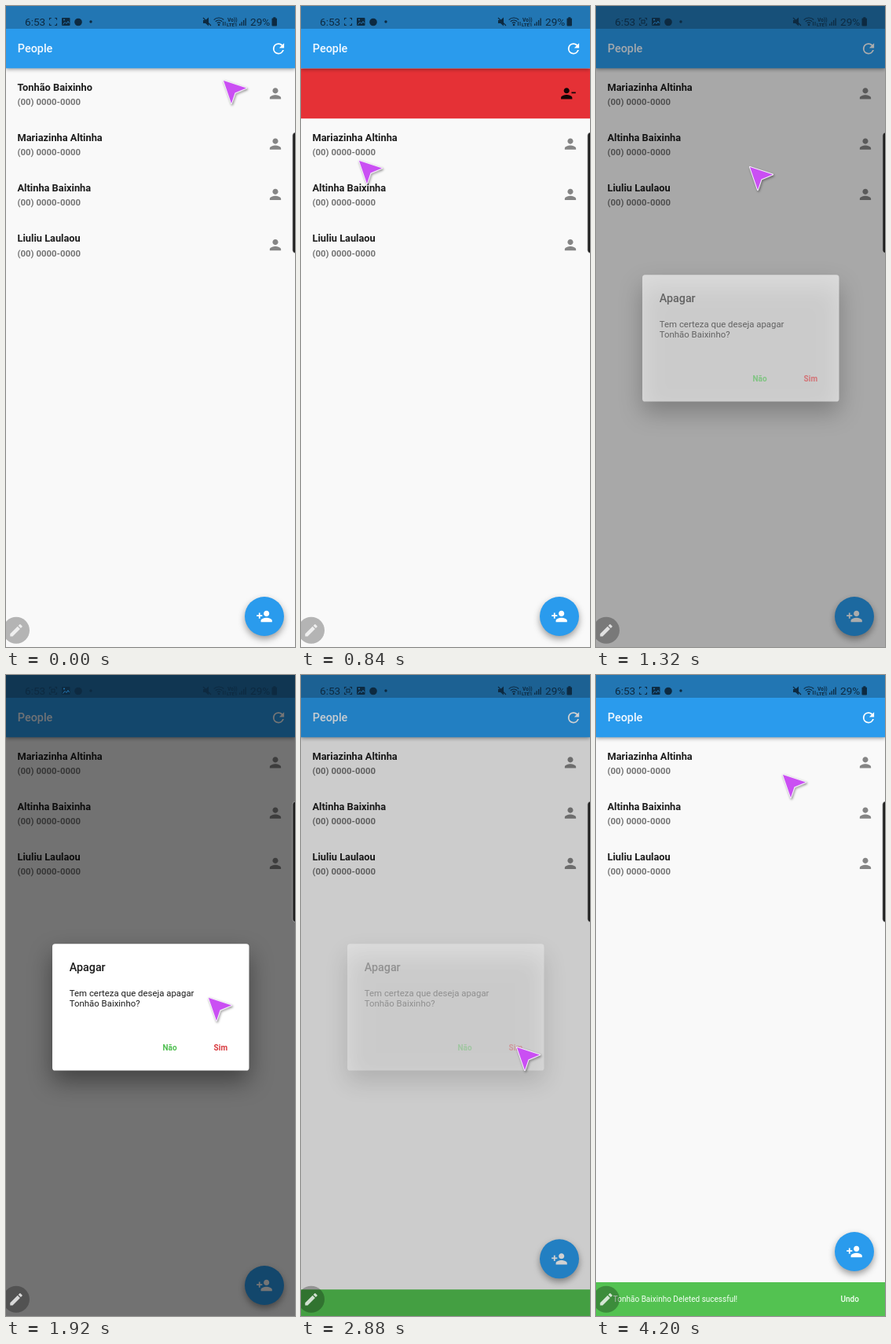
An HTML page with a canvas that plays this animation: 368 px wide and 816 px high, repeating every 4320 ms.

```html
<!DOCTYPE html>
<html lang="pt">
<head>
<meta charset="utf-8">
<title>People</title>
<style>
  html, body { margin: 0; width: 368px; height: 816px; overflow: hidden; background: #f9f9f9; }
  canvas { display: block; width: 368px; height: 816px; }
</style>
</head>
<body>
<canvas id="stage"></canvas>
<script>
const W = 368, H = 816, LOOP = 4320, STEP = 120, DP = 0.892;
const ROW_TOP = 79.2, ROW_H = 64.25;
const canvas = document.getElementById('stage');
const ratio = window.devicePixelRatio || 1;
canvas.width = W * ratio;
canvas.height = H * ratio;
const ctx = canvas.getContext('2d');

const people = ['Tonhão Baixinho', 'Mariazinha Altinha', 'Altinha Baixinha', 'Liuliu Laulaou'];

const body = 'c2.21 0 4-1.79 4-4s-1.79-4-4-4-4 1.79-4 4 1.79 4 4 4zm0 2c-2.67 0-8 1.34-8 4v2h16v-2c0-2.66-5.33-4-8-4z';
const icons = {
  person: new Path2D('M12 12' + body),
  add: new Path2D('M15 12' + body + 'M6 10V7H4v3H1v2h3v3h2v-3h3v-2z'),
  remove: new Path2D('M10 12' + body + 'M17 10v2h6v-2z'),
  refresh: new Path2D('M17.65 6.35C16.2 4.9 14.2 4 12 4a8 8 0 1 0 7.73 10h-2.08A6 6 0 1 1 12 6c1.66 0 3.14.69 4.22 1.78L13 11h7V4z'),
  pencil: new Path2D('M3 17.25V21h3.75L17.8 9.94l-3.75-3.75zM20.7 7.04a1 1 0 0 0 0-1.41l-2.34-2.34a1 1 0 0 0-1.41 0l-1.83 1.83 3.75 3.75z'),
  pointer: new Path2D('M0 0L29 9.5 14.5 15.5 10 29z')
};

// time, x, y of the pointer tip
const pointerPath = [
  [0, 277, 95], [120, 269, 100], [240, 232, 111], [360, 180, 133], [480, 122, 168],
  [600, 74, 203], [720, 62, 206], [840, 74, 197], [1080, 142, 173], [1200, 177, 170],
  [1440, 215, 240], [1680, 246, 350], [1920, 258, 411], [2160, 268, 450], [2400, 274, 474],
  [2880, 275, 474], [3120, 277, 490], [3360, 274, 519], [3600, 262, 450],
  [3840, 235, 310], [4080, 222, 183], [4200, 238, 127]
];

const clamp = v => Math.max(0, Math.min(1, v));
const span = (t, from, to) => clamp((t - from) / (to - from));
const easeOut = p => 1 - (1 - p) ** 3;

function pointerAt(t) {
  const i = pointerPath.findIndex(p => p[0] >= t);
  if (i < 1) return pointerPath[0].slice(1);
  const [t0, x0, y0] = pointerPath[i - 1], [t1, x1, y1] = pointerPath[i];
  const p = span(t, t0, t1);
  return [x0 + (x1 - x0) * p, y0 + (y1 - y0) * p];
}

function rect(x, y, w, h, color, r = 0) {
  ctx.fillStyle = color;
  ctx.beginPath();
  ctx.roundRect(x, y, w, h, r);
  ctx.fill();
}

function disc(x, y, r, color) {
  ctx.fillStyle = color;
  ctx.beginPath();
  ctx.arc(x, y, r, 0, 7);
  ctx.fill();
}

function text(s, x, y, size, color, weight = 400) {
  ctx.font = `${weight} ${size}px Roboto, sans-serif`;
  ctx.fillStyle = color;
  ctx.fillText(s, x, y);
}

function icon(name, cx, cy, color, scale = DP) {
  ctx.save();
  ctx.translate(cx, cy);
  ctx.scale(scale, scale);
  ctx.translate(-12, -12);
  ctx.fillStyle = color;
  ctx.fill(icons[name]);
  ctx.restore();
}

function line(color, width, ...points) {
  ctx.strokeStyle = color;
  ctx.lineWidth = width;
  ctx.beginPath();
  points.forEach(([x, y], i) => i ? ctx.lineTo(x, y) : ctx.moveTo(x, y));
  ctx.stroke();
}

function withShadow(color, blur, dy, draw, dx = 0) {
  ctx.save();
  ctx.shadowColor = color;
  ctx.shadowBlur = blur * ratio;
  ctx.shadowOffsetX = dx * ratio;
  ctx.shadowOffsetY = dy * ratio;
  draw();
  ctx.restore();
}

function drawRow(name, top, dx = 0) {
  text(name, 14.5 + dx, top + 28.3, 12.8, '#1d1d1d', 700);
  text('(00) 0000-0000', 14.5 + dx, top + 46.7, 11.4, '#747474', 700);
  icon('person', 343 + dx, top + 32.2, '#858585');
}

function drawList(t) {
  const drag = t <= 720 ? Math.min(0, pointerAt(t)[0] - 274.5) : -W;
  const collapse = easeOut(span(t, 1030, 1225));
  const height = ROW_H * (1 - collapse);
  if (height > 0) {
    ctx.save();
    ctx.beginPath();
    ctx.rect(0, ROW_TOP, W, height);
    ctx.clip();
    if (drag < 0) {
      rect(W + drag, ROW_TOP, -drag, ROW_H, '#e53136');
      ctx.save();
      ctx.beginPath();
      ctx.rect(W + drag, ROW_TOP, -drag, ROW_H);
      ctx.clip();
      icon('remove', 340, ROW_TOP + height / 2, '#140506');
      ctx.restore();
    }
    drawRow(people[0], ROW_TOP, drag);
    ctx.restore();
  }
  people.slice(1).forEach((name, i) => drawRow(name, ROW_TOP + height + i * ROW_H));
}

function drawAppBar() {
  withShadow('rgba(0,0,0,.4)', 5, 1.5, () => rect(0, 0, W, 79.2, '#2a9bed'));
  rect(0, 0, W, 29, '#2276b3');
  text('People', 14.8, 59, 14.4, '#f4faff', 500);
  icon('refresh', 347, 54.3, '#fff');
}

function drawStatus(t) {
  const ink = '#0d2a41';
  ctx.save();
  ctx.beginPath();
  ctx.rect(0, 0, W, 28.5);
  ctx.clip();
  text('6:53', 24, 25, 13.6, ink);
  text('29%', 311, 25, 13.6, ink);

  for (const sx of [-1, 1]) for (const sy of [-1, 1]) {
    const x = 60 + sx * 4.5, y = 20 + sy * 4.5;
    line(ink, 1.1, [x - sx * 2.3, y], [x, y], [x, y - sy * 2.3]);
  }
  const phase = t % 800;
  if (phase >= 240 && phase < 600) {
    ctx.strokeStyle = ink;
    ctx.strokeRect(58, 18, 4, 4);
  }

  rect(71, 15, 10.5, 10, ink, 1);
  line('#2276b3', 1, [72.5, 23.5], [75, 20.5], [77, 22.5], [79, 19.5], [80.5, 22]);
  disc(74, 17.5, 1, '#2276b3');
  disc(92, 20.5, 4.8, ink);
  disc(108, 20, 1.7, ink);

  ctx.fillStyle = ink;
  ctx.fill(new Path2D('M251 18h3l4-3.5v11L254 22h-3z'));
  line(ink, 1.2, [251, 15], [261, 25]);
  ctx.lineWidth = 1.2;
  for (const r of [3, 6, 9]) {
    ctx.beginPath();
    ctx.arc(271, 24, r, -2.35, -0.8);
    ctx.stroke();
  }
  disc(271, 24, 1.3, ink);
  line(ink, 1, [276.5, 20], [276.5, 25]);
  line(ink, 1, [279, 20], [279, 25]);
  text('Vo))', 282, 19.5, 6.6, ink, 700);
  text('LTE1', 281, 25.6, 6.2, ink, 700);
  for (let i = 0; i < 4; i++) rect(297 + i * 2.5, 22.5 - i * 2.3, 1.3, 2.5 + i * 2.3, ink);
  rect(338.5, 15.5, 6.5, 10, ink, 1);
  rect(340.3, 14.3, 3, 2, ink);
  ctx.restore();
}

function drawSnackAndButton(t) {
  const rise = 43 * easeOut(span(t, 2800, 3000));
  if (rise > 0) {
    rect(0, H - rise, W, 43, '#53c251');
    ctx.globalAlpha = span(t, 3000, 3240);
    text('Tonhão Baixinho Deleted sucessful!', 21.8, 841 - rise, 10, '#f6fff6');
    text('Undo', 311.5, 841 - rise, 10, '#f6fff6', 500);
    ctx.globalAlpha = 1;
  }
  const y = 777 - rise;
  withShadow('rgba(0,0,0,.38)', 9, 4, () => disc(329, y, 25, '#2a9bed'));
  icon('add', 329, y, '#fff');
}

function drawDialog(alpha) {
  if (alpha <= 0) return;
  ctx.globalAlpha = alpha;
  rect(0, 0, W, H, 'rgba(0,0,0,.54)');
  withShadow('rgba(0,0,0,.42)', 30, 14, () => rect(59, 342.3, 250.5, 161.2, '#fff', 3.6));
  text('Apagar', 80.8, 376.8, 14.3, '#1c1c1c', 500);
  text('Tem certeza que deseja apagar', 80.8, 409, 11.4, '#1c1c1c');
  text('Tonhão Baixinho?', 80.8, 422.4, 11.4, '#1c1c1c');
  text('Não', 199.5, 478.2, 10, '#4fbf51', 700);
  text('Sim', 264.6, 478.2, 10, '#d8383d', 700);
  ctx.globalAlpha = 1;
}

function drawOverlays() {
  rect(364.6, 160.5, 12, 154.5, '#9b9b9b', 4.5);
  rect(365.4, 161.3, 12, 152.9, '#1e1e1e', 4);
  disc(13, 794.8, 17, 'rgba(0,0,0,.28)');
  icon('pencil', 13, 794.8, 'rgba(255,255,255,.78)', 0.86);
}

function drawPointer(t) {
  const [x, y] = pointerAt(t);
  ctx.save();
  ctx.translate(x, y);
  ctx.lineJoin = 'round';
  ctx.lineWidth = 2.2;
  ctx.strokeStyle = '#f5effa';
  withShadow('rgba(0,0,0,.45)', 3, 1.5, () => ctx.stroke(icons.pointer), 1);
  ctx.fillStyle = '#ca4ff3';
  ctx.fill(icons.pointer);
  ctx.restore();
}

function draw(now) {
  const t = Math.floor((now % LOOP) / STEP) * STEP;
  ctx.setTransform(ratio, 0, 0, ratio, 0, 0);
  rect(0, 0, W, H, '#f9f9f9');
  drawList(t);
  drawAppBar();
  drawSnackAndButton(t);
  drawDialog(span(t, 1230, 1380) * (1 - span(t, 2780, 2930)));
  drawStatus(t);
  drawOverlays();
  drawPointer(t);
}

const start = performance.now();
function tick() {
  draw(performance.now() - start);
  requestAnimationFrame(tick);
}
tick();
</script>
</body>
</html>
```
